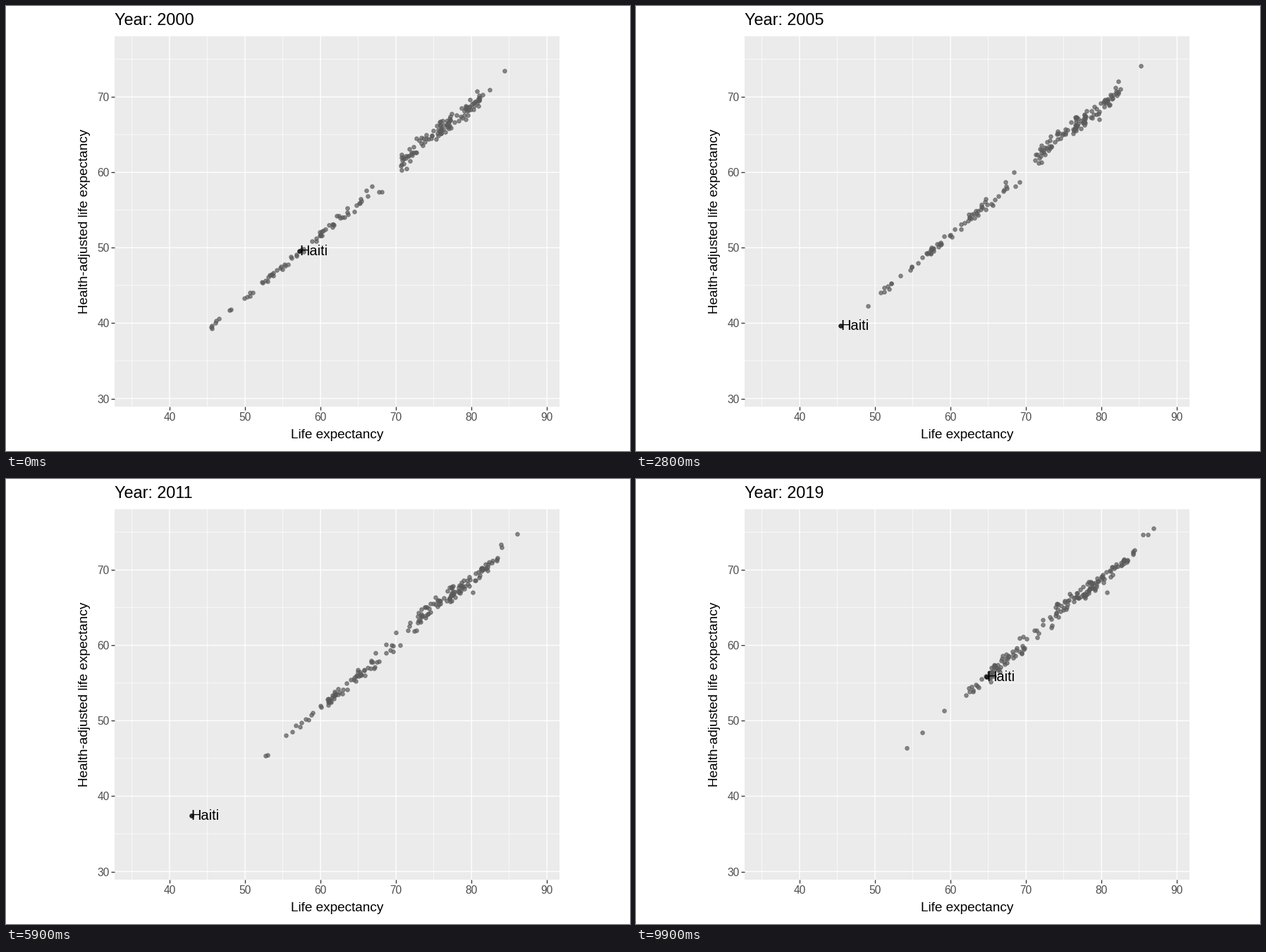
A matplotlib script for the animation above (10 s loop, 885 px wide and 632 px high).

```python
import numpy as np
import matplotlib.pyplot as plt
from matplotlib.animation import FuncAnimation

W, H, DPI = 885, 632, 100
FRAMES = 100
PX = 72 / DPI  # points per pixel
plt.rcParams["font.family"] = "Liberation Sans"

# Panel edges in pixels and the data scale inside it
LEFT, RIGHT, TOP, BOTTOM = 154, 784.5, 43, 568.5
UNIT = 10.708

# Surveys of 2000, 2010, 2015 and 2019; motion between them is linear
KEY_FRAMES = [0, 52, 78, 99]
PROGRESS = [0, 0.6, 0.83, 1]
HAITI = np.array([(57.2, 49.6), (35.4, 31.2), (63.1, 54.45), (64.75, 55.8)])

# Countries at the rim of the band: (life, healthy life) first and last
RIM = np.array([
    [(84.4, 73.5), (86.9, 75.5)],
    [(80.7, 70.8), (85.5, 74.7)],
    [(79.8, 69.6), (86.1, 74.7)],
    [(79.2, 67.0), (80.7, 67.0)],
    [(50.7, 43.6), (54.2, 46.4)],
    [(45.6, 39.3), (56.3, 48.4)],
    [(48.1, 41.8), (59.2, 51.3)],
])
BULK = 175


def to_px(x, y):
    return 231.9 + (x - 40) * UNIT, 129.2 + (70 - y) * UNIT


def to_data(px, py):
    return 40 + (px - 231.9) / UNIT, 70 - (py - 129.2) / UNIT


def life(u, p):
    """Life expectancy of the country at standing u (0 to 1) and progress p."""
    base = np.interp(u, [0, 0.05, 0.2, 0.4, 0.6, 0.8, 0.9, 1],
                     [45.2, 51.9, 60.6, 70.6, 74.7, 77.3, 79.7, 82.5])
    return base + p * (2 + 14.5 * (1 - u) ** 5)


def healthy(x):
    return 39.3 + 0.8425 * (x - 45.2) + 0.65 * np.exp(-((x - 74) / 5) ** 2)


def spread(x):
    return 0.2 + 0.5 * np.exp(-((x - 72) / 9) ** 2)


def survey_points():
    """Positions of all countries, shape (survey, country, 2)."""
    rng = np.random.default_rng(12)
    u = rng.uniform(size=BULK)
    trait = np.clip(rng.normal(size=BULK), -1.7, 1.7)
    surveys = []
    for p, haiti in zip(PROGRESS, HAITI):
        x = life(u, p)
        y = healthy(x) + spread(x) * (0.95 * trait + 0.25 * rng.normal(size=BULK))
        rim = RIM[:, 0] * (1 - p) + RIM[:, 1] * p
        surveys.append(np.vstack([np.column_stack([x, y]), rim, haiti]))
        # drift in standing, reflected at both ends
        u = 1 - np.abs(1 - np.abs(u + rng.normal(0, 0.025, BULK)))
    return np.array(surveys)


def between(surveys, frame):
    k = min(np.searchsorted(KEY_FRAMES, frame, side="right") - 1, 2)
    start, end = KEY_FRAMES[k], KEY_FRAMES[k + 1]
    t = (frame - start) / (end - start)
    return surveys[k] * (1 - t) + surveys[k + 1] * t


POINTS = survey_points()
fig = plt.figure(figsize=(W / DPI, H / DPI), dpi=DPI, facecolor="white")


def label(x, y, s, size, **kw):
    return fig.text(x / W, 1 - y / H, s, fontsize=size * PX,
                    **{"va": "baseline", "ha": "center", **kw})


ax = fig.add_axes([LEFT / W, 1 - BOTTOM / H, (RIGHT - LEFT) / W, (BOTTOM - TOP) / H],
                  facecolor="#EBEBEB")
x0, y1 = to_data(LEFT, TOP)
x1, y0 = to_data(RIGHT, BOTTOM)
ax.set(xlim=(x0, x1), ylim=(y0, y1), xticks=range(40, 91, 10), yticks=range(30, 71, 10))
for side in ax.spines.values():
    side.set_visible(False)
ax.tick_params(length=4.6 * PX, width=1.33 * PX, color="#333333",
               labelbottom=False, labelleft=False)

for first, width in ((35, 0.67), (30, 1.33)):
    for v in range(first, 91, 10):
        style = dict(color="white", lw=width * PX, snap=False, zorder=1)
        if x0 < v < x1:
            ax.axvline(v, **style)
        if y0 < v < y1:
            ax.axhline(v, **style)

for v in range(40, 91, 10):
    label(to_px(v, 0)[0], 589, str(v), 15.5, color="#4D4D4D")
for v in range(30, 71, 10):
    label(146.5, to_px(0, v)[1] + 6, str(v), 15.5, color="#4D4D4D", ha="right")
label((LEFT + RIGHT) / 2, 614, "Life expectancy", 19)
label(111.5, (TOP + BOTTOM) / 2, "Health-adjusted life expectancy", 19,
      rotation=90, va="center")
title = label(154, 27, "", 23.4, ha="left")


def dots(points, color, alpha, z):
    return ax.scatter(points[:, 0], points[:, 1], s=(5.5 * PX) ** 2, linewidths=PX,
                      facecolors=color, edgecolors=color, alpha=alpha, zorder=z)


countries = dots(POINTS[0], "#5A5A5A", 0.7, 3)
marker = dots(HAITI[:1], "black", 0.65, 4)
name = label(0, 0, "Haiti", 20, ha="left")


def draw(frame):
    countries.set_offsets(between(POINTS, frame))
    spot = between(HAITI, frame)
    marker.set_offsets([spot])
    px, py = to_px(*spot)
    name.set_position((px / W, 1 - (py + 6) / H))
    title.set_text(f"Year: {int(2000 + 19 * frame / (FRAMES - 1))}")
    return countries, marker, name, title


anim = FuncAnimation(fig, draw, frames=FRAMES, interval=100, repeat=True,
                     repeat_delay=0, blit=False)
plt.show()
```
